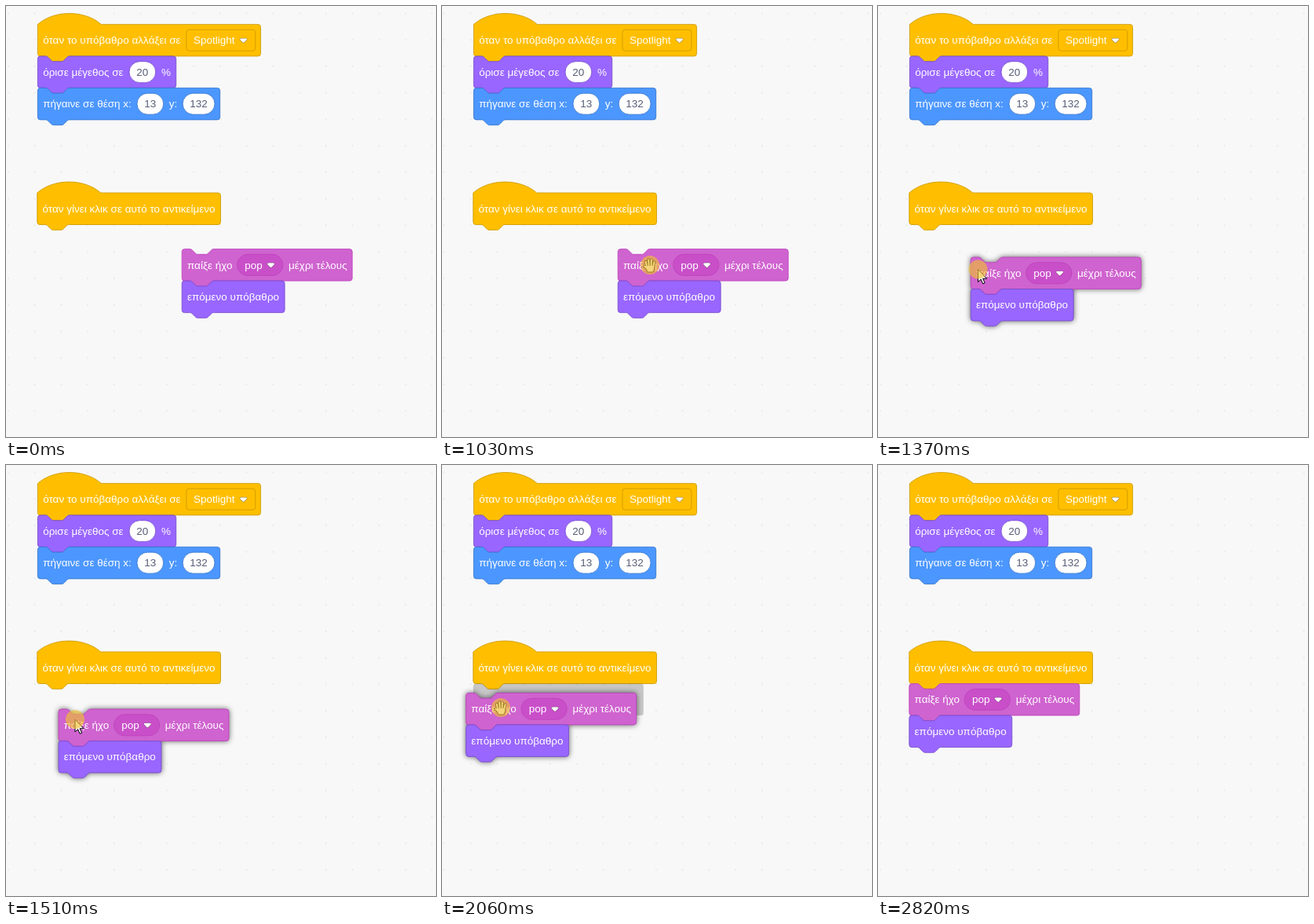
An HTML page that plays this animation: 548x549 px, repeating every 3280 ms.

```html
<!DOCTYPE html>
<html lang="el">
<head>
<meta charset="utf-8">
<title>Block drag</title>
<style>
  html, body { margin: 0; height: 100%; overflow: hidden; background: #f8f8f8; }
  svg { display: block; width: 548px; height: 549px; }
  text { font: 16px "Liberation Sans", Arial, sans-serif; fill: #fff; }
  .num { fill: #575e75; text-anchor: middle; }
  .lifted { filter: drop-shadow(0 0 4.5px rgba(0, 0, 0, .6)); }
</style>
</head>
<body>
<svg viewBox="0 0 548 549">
  <defs>
    <pattern id="grid" x="2" y="8.5" width="33.75" height="33.75" patternUnits="userSpaceOnUse">
      <rect width="1.6" height="1.6" fill="#e4e4e4"/>
    </pattern>
  </defs>
  <rect width="548" height="549" fill="#f8f8f8"/>
  <rect width="548" height="549" fill="url(#grid)"/>
  <g id="fixed"></g>
  <g id="marker"></g>
  <g id="stack"></g>
  <g id="cursor">
    <path id="arrow" d="M0 0V16L3.7 12.6 6.2 18.3 8.6 17.3 6.1 11.7H11Z" fill="#fff" stroke="#000"/>
    <g id="hand" stroke-linecap="round" stroke-linejoin="round"></g>
    <circle id="press" r="12" fill="#f0be32" fill-opacity=".65"/>
  </g>
</svg>
<script>
const $ = id => document.getElementById(id);
const SCALE = 0.84375, ROW = 48;
const YELLOW = ['#ffbf00', '#cc9900'], PURPLE = ['#9966ff', '#774dcb'],
      BLUE = ['#4c97ff', '#3373cc'], PINK = ['#cf63cf', '#bd42bd'];

// Block outline in workspace units
function outline(w, hat) {
  const top = hat
    ? 'M0 0c25-22 71-22 96 0'
    : 'M0 4A4 4 0 0 1 4 0H12c2 0 3 1 4 2l4 4c1 1 2 2 4 2h12c2 0 3-1 4-2l4-4c1-1 2-2 4-2';
  return `${top}H${w - 4}a4 4 0 0 1 4 4V44a4 4 0 0 1-4 4H48` +
    'c-2 0-3 1-4 2l-4 4c-1 1-2 2-4 2h-12c-2 0-3-1-4-2l-4-4c-1-1-2-2-4-2H4a4 4 0 0 1-4-4Z';
}

const label = (x, s, cls = '') => `<text x="${x}" y="29.6" class="${cls}">${s}</text>`;
const field = (x, w, r, fill, line) =>
  `<rect x="${x}" y="8" width="${w}" height="32" rx="${r}" fill="${fill}" stroke="${line}"/>`;
const number = (x, w, s, line) => field(x, w, 16, '#fff', line) + label(x + w / 2, s, 'num');

function caret(x) {
  const d = 'M6.36 7.79a1.43 1.43 0 0 1-1-.42L1.42 3.45a1.44 1.44 0 0 1 0-2c.56-.56 9.31-.56 9.87 0' +
    'a1.44 1.44 0 0 1 0 2L7.37 7.37A1.43 1.43 0 0 1 6.36 7.79Z';
  return `<g transform="translate(${x} 20)"><path d="${d}" stroke="#231f20" stroke-width="2"
    stroke-opacity=".1"/><path d="${d}" fill="#fff"/></g>`;
}

const block = (row, w, [fill, line], content, hat) =>
  `<g transform="translate(0 ${row * ROW})"><path d="${outline(w, hat)}" fill="${fill}" stroke="${line}"/>${content}</g>`;
const place = (x, y) => `translate(${x} ${y}) scale(${SCALE})`;

$('fixed').innerHTML =
  `<g transform="${place(40.4, 23.4)}">` +
  block(0, 336.8, YELLOW, label(8, 'όταν το υπόβαθρο αλλάξει σε') +
    field(224.6, 104.2, 4, ...YELLOW) + label(235.4, 'Spotlight') + caret(304.4), true) +
  block(1, 209, PURPLE, label(8, 'όρισε μέγεθος σε') +
    number(138.2, 40, '20', PURPLE[1]) + label(186.8, '%')) +
  block(2, 275.3, BLUE, label(8, 'πήγαινε σε θέση x:') + number(150, 40, '13', BLUE[1]) +
    label(198.4, 'y:') + number(219, 48.4, '132', BLUE[1])) +
  `</g><g transform="${place(39.8, 238)}">` +
  block(0, 277, YELLOW, label(8, 'όταν γίνει κλικ σε αυτό το αντικείμενο'), true) + '</g>';

$('marker').innerHTML =
  `<path transform="${place(39.8, 278.5)}" d="${outline(257.2)}" fill-opacity=".2"/>`;

$('stack').innerHTML =
  block(0, 257.2, PINK, label(8, 'παίξε ήχο') + field(83.5, 69, 16, '#c94fc9', PINK[1]) +
    label(95, 'pop') + caret(128) + label(161, 'μέχρι τέλους')) +
  block(1, 155.2, PURPLE, label(8, 'επόμενο υπόβαθρο'));

const fingers = 'M-4 2L-5.2-4.3M-1.3 1L-1.8-6.8M1.6 1L1.8-6.4M4.2 2L5.5-3.8M-3 5L-6.8 1.6';
const palm = 'M-4.2 2H4.4L3.8 5.5 2.8 7.6H-2.2Z';
$('hand').innerHTML = [['#000', 3.8], ['#fff', 2]].map(([c, w]) =>
  `<path d="${fingers}${palm}" fill="${c}" stroke="${c}" stroke-width="${w}"/>`).join('');

// Keys: [tick, x, y]
const cursorPath = [
  [0, 470, 538], [1, 412, 497], [2, 368, 468], [3, 306, 426], [5, 270, 378], [6, 261, 356],
  [7, 261, 345], [11, 265, 330], [13, 265, 330], [14, 262, 332], [15, 235, 338], [16, 200, 342],
  [18, 127.5, 335.5], [20, 88, 324], [22, 70, 313], [24, 68, 311], [27, 72, 311], [28, 75, 309],
  [30, 81, 303], [33, 82, 303], [34, 115, 322], [38, 468, 535]
];
const stackPath = [
  [14, 224.2, 309.6], [15, 205, 317], [16, 176, 322], [18, 118.2, 320], [20, 67, 311],
  [21, 46, 303], [22, 33.5, 297.6], [24, 26, 291], [27, 27.5, 291], [28, 30.6, 290.4],
  [30, 38, 284], [32, 38, 284], [33, 39.8, 278.5]
];

function along(keys, n) {
  const i = keys.findIndex(k => k[0] >= n);
  if (i < 0) return keys.at(-1).slice(1);
  if (i === 0) return keys[0].slice(1);
  const [n0, x0, y0] = keys[i - 1], [n1, x1, y1] = keys[i];
  const p = (n - n0) / (n1 - n0);
  return [x0 + (x1 - x0) * p, y0 + (y1 - y0) * p];
}

const show = (id, on) => $(id).setAttribute('visibility', on ? 'inherit' : 'hidden');
const within = (n, a, b) => n >= a && n <= b;

function draw(ms) {
  const n = Math.floor((ms % 3280 - 127) / 68.88);
  $('stack').setAttribute('transform', place(...along(stackPath, n)));
  $('stack').classList.toggle('lifted', within(n, 15, 32));
  show('marker', within(n, 21, 32));

  const hand = within(n, 5, 15) || within(n, 21, 34);
  $('cursor').setAttribute('transform', `translate(${along(cursorPath, n)})`);
  show('cursor', within(n, 0, 38));
  show('hand', hand);
  show('arrow', !hand);
  show('press', within(n, 13, 32));
}

const start = performance.now();
function loop() {
  draw(performance.now() - start);
  requestAnimationFrame(loop);
}
loop();
</script>
</body>
</html>
```
